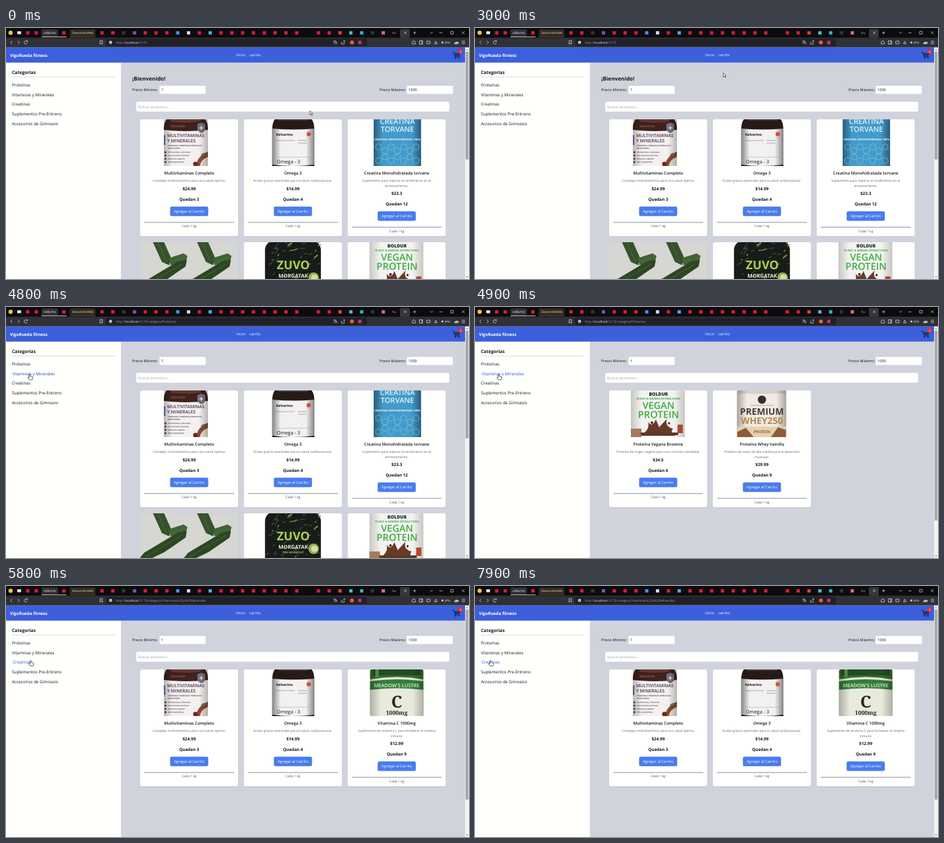
Recreate the animation shown at these times as an HTML page. Size 704 by 382 pixels, loop 8000 ms.

```html
<!DOCTYPE html>
<html lang="es">
<head>
<meta charset="utf-8">
<title>Tienda de suplementos</title>
<style>
html, body { margin: 0; width: 100%; height: 100%; overflow: hidden; background: #d0d3dc; }
svg { display: block; width: 100vw; height: 100vh; font-family: "Open Sans", "Noto Sans", sans-serif; text-rendering: geometricPrecision; }
</style>
</head>
<body>
<svg id="stage" viewBox="0 0 704 382" preserveAspectRatio="none"></svg>
<script>
const LOOP = 8000, STEP = 100;
const INK = '#10141d', RED = '#e0193a';

const rect = (x, y, w, h, fill, extra = '') =>
  `<rect x="${x}" y="${y}" width="${w}" height="${h}" fill="${fill}" ${extra}/>`;
const circle = (x, y, r, fill) => `<circle cx="${x}" cy="${y}" r="${r}" fill="${fill}"/>`;
const line = (d, color, width = 0.8, extra = '') =>
  `<path d="${d}" fill="none" stroke="${color}" stroke-width="${width}" ${extra}/>`;
const shape = (d, fill, extra = '') => `<path d="${d}" fill="${fill}" ${extra}/>`;
const text = (x, y, str, size, fill = INK, weight = 400, extra = '') =>
  `<text x="${x}" y="${y}" font-size="${size}" fill="${fill}" font-weight="${weight}" ${extra}>${str}</text>`;
const label = (x, y, str, size, fill, weight, extra = '') =>
  text(x, y, str, size, fill, weight, 'text-anchor="middle" ' + extra);
const group = (content, attrs = '') => `<g ${attrs}>${content}</g>`;
const repeat = (n, fn) => Array.from({ length: n }, (_, i) => fn(i)).join('');
const noise = n => { const v = Math.sin(n * 12.9898) * 43758.5453; return v - Math.floor(v); };

// Product pictures, drawn in a 149 x 71 box
const art = {
  multi() {
    const purple = '#463350';
    return shape('M40 0H99Q103 6 103 14V71H36V14Q36 6 40 0Z', '#3f211d') +
      shape('M46 0H92V3Q70 7 46 3Z', '#64382f') + label(58, 11.5, 'bienestar', 5, '#8f665b', 600) +
      shape('M36 16Q70 20 103 16V71H36Z', '#f4f0ee') +
      shape('M87 7L93 5L99 7V15Q98 19 93 21Q88 19 87 15Z', '#73717d') + line('M90 13H96M93 10V16', '#fff', 1.2) +
      rect(36, 24, 2.4, 15, '#7d77bd') +
      text(41, 26.7, 'MULTIVITAMINAS', 6.8, purple, 600) + text(41, 35.2, 'Y MINERALES', 6.8, purple, 600) +
      text(42, 41, 'VITAMINAS Y MINERALES ESENCIALES', 2.9, purple, 600) +
      text(42, 44.8, 'DOSIS DIARIA', 2.9, purple, 600) +
      repeat(4, i => circle(38.5, 50 + i * 5, 1.6, '#5c4376') +
        text(42, 51 + i * 5, ['25 vitaminas y minerales', 'Con extractos de frutas', 'Apto para veganos', '365 comprimidos'][i], 2.9, purple, 600)) +
      shape('M85 71Q86 57 103 49V71Z', '#8a4a38') + shape('M91 71Q91 62 103 57V71Z', '#efe2d6') +
      circle(84, 68, 3.5, '#6a2622') + shape('M92 55Q96 49 100 52Q97 56 92 55Z', '#6a7b45') + rect(36, 0, 67, 71, 'url(#shade)', 'opacity=".25"');
  },
  omega() {
    return shape('M47 0H103Q107 5 107 16V71H43V16Q43 5 47 0Z', '#261a18') + rect(52, 0, 46, 2, '#4c3a35') +
      shape('M43 14Q75 17 107 14V69Q75 73 43 69Z', '#f3f1f0') + rect(43, 14, 64, 57, 'url(#shade)', 'opacity=".45"') +
      text(49, 24.8, 'Kelvarino', 5.3, INK, 700) + circle(98.5, 22.5, 3.2, '#de4b36') +
      text(49, 33, 'Omega-3 para el corazón', 2.4, '#444') + text(82, 33, 'Salud diaria', 2.4, '#444') +
      text(82, 37, '60 cápsulas', 2.4, '#444') +
      line('M50 57.5H101', '#888', 0.4) + text(50, 66.5, 'Omega - 3', 7.4, '#1d1d1d', 500);
  },
  creatine() {
    const hex = (x, y) => line(`M${x} ${y - 5}l4.3 2.5v5l-4.3 2.5l-4.3-2.5v-5z`, '#9cd0e8', 0.6);
    return rect(39.5, 0, 72, 71, '#429bcb') + rect(39.5, 0, 72, 71, 'url(#shade)', 'opacity=".4"') +
      repeat(14, i => hex(47 + i % 7 * 9.5, 42 + Math.floor(i / 7) * 15 + i % 2 * 6)) +
      label(75.5, 7, 'CREATINA', 11.2, '#e4f0f5', 600) + label(75.5, 18.7, 'TORVANE', 11.2, '#e4f0f5', 600) +
      label(75.5, 32.3, 'CREATINA MONOHIDRATADA 100%', 4.1, '#eff7fa', 700);
  },
  straps() {
    const strap = x => group(
      shape('M19 -1H36L47 24L44 35L33 30Z', '#35522b') + shape('M44 24L66 17L72 21L69 31L46 35Z', '#426335') +
      shape('M58 29L71 27L69 37L37 59L10 72H-4L6 60Z', '#2c4722') +
      line('M27 0L40 30M47 30L68 23M64 33L8 66', '#587347', 0.7), `transform="translate(${x})"`);
    return rect(0, 0, 149, 71, '#d6d6d2') + strap(0) + strap(67);
  },
  preworkout() {
    return shape('M38 0H111Q117 5 117 12V71H32V12Q32 5 38 0Z', '#171c18') +
      repeat(60, i => {
        const x = 33 + noise(i + 1) * 80, y = noise(i + 70) * 68;
        return line(`M${x} ${y}l${2 + noise(i + 9) * 5} ${-6 * noise(i + 30)}`, i % 4 ? '#465043' : '#8da44e', 1.2);
      }) +
      rect(51, 25, 48, 18, '#1a201a', 'opacity=".65"') +
      label(75, 41, 'ZUVO', 18, '#add253', 700) + label(75, 53.5, 'MORGATAK', 8, '#eef0dc', 700) +
      label(75, 61, 'PRE-WORKOUT', 4.5, '#b9d18a', 600) + circle(106, 54, 8, '#93b34b') + circle(107, 54, 5, '#d7dbaa');
  },
  vegan() {
    const green = '#3cae43';
    return rect(33, 0, 82, 71, '#f3f2ef') + rect(33, 0, 82, 71, 'url(#shade)', 'opacity=".18"') +
      label(75, 7.7, 'BOLDUR', 6.9, '#1c2b22', 800) +
      label(75, 14.3, 'PLANT &amp; GREENS EXTRACTIONS', 4.3, green, 700) +
      label(75, 27.5, 'VEGAN', 14.5, green, 600) + label(75, 41.5, 'PROTEIN', 14.8, green, 600) +
      shape('M53 65Q62 57 59 48Q66 57 71 44L76 56L88 43Q84 55 97 58Q92 65 101 69H47Z', '#673a2a') +
      circle(65, 49, 2, '#4f2a20') + circle(91, 50, 1.7, '#4f2a20') +
      rect(33, 58, 16, 13, '#a77a59') + rect(48, 64, 57, 4, '#5d3728') + rect(104, 52, 8, 13, '#ac4b33');
  },
  whey() {
    return rect(36.5, 0, 75, 71, '#f0eae2', 'rx="2"') + rect(38, 0, 72, 5, '#d6d0c6') +
      rect(36.5, 0, 75, 71, 'url(#shade)', 'opacity=".3"') +
      circle(74.5, 14, 6.3, '#33312f') + rect(57, 22.5, 35, 0.7, '#9a8c7d') +
      label(74.5, 37, 'PREMIUM', 13.8, '#493a34', 700) + label(74.5, 51, 'WHEY250', 13.8, '#ae8751', 700) +
      rect(37, 55, 74, 16, '#e6d0ae') + shape('M37 63L50 57L62 71H37ZM111 60L99 56L88 71H111Z', '#8d5c3a') +
      label(74.5, 65, 'PROTEIN', 6, '#74523a', 600);
  },
  vitaminC() {
    return rect(34, 0, 81, 71, '#376d2a', 'rx="3"') + rect(38, 0, 73, 9, '#224d22') + rect(42, 0, 5, 12, '#5b944b') +
      shape('M34 15Q75 8 115 15V71H34Z', '#e8eadc') +
      shape('M34 18Q75 12 115 18V31Q75 26 34 31Z', '#347e39') +
      label(74.5, 27, 'MEADOW\'S LUSTRE', 7.5, '#f3f5e5', 600) +
      label(74.5, 58, 'C', 25, '#20251f', 700, 'style="font-family:\'Noto Serif\',serif"') +
      label(74.5, 68.5, '1000mg', 8.7, '#252b23', 700, 'style="font-family:\'Noto Serif\',serif"') +
      rect(34, 0, 81, 71, 'url(#shade)', 'opacity=".25"');
  }
};

const products = {
  multi: ['Multivitaminas Completo', ['Complejo multivitamínico para una salud óptima.'], '$24.99', 3],
  omega: ['Omega 3', ['Ácidos grasos esenciales para la salud cardiovascular.'], '$14.99', 4],
  creatine: ['Creatina Monohidratada torvane', ['Suplemento para mejorar el rendimiento en el', 'entrenamiento.'], '$23.3', 12],
  vegan: ['Proteína Vegana Brownie', ['Proteína de origen vegetal para una nutrición saludable.'], '$34.5', 6],
  whey: ['Proteína Whey Vainilla', ['Proteína de suero de alta calidad para el desarrollo', 'muscular.'], '$29.99', 9],
  vitaminC: ['Vitamina C 1000mg', ['Suplemento de vitamina C para fortalecer el sistema', 'inmune.'], '$12.99', 9]
};

function card(id, index) {
  const x = 204 + index % 3 * 157.8, y = 139 + Math.floor(index / 3) * 187;
  let body = rect(0.3, 1, 149, 178, '#bbbfc9', 'rx="3"') + rect(0, 0, 149, 178, '#fffffd', 'rx="3"') +
    group(art[id](), 'clip-path="url(#picture)"');
  if (products[id]) {
    const [title, desc, price, stock] = products[id], d = (desc.length - 1) * 7.3;
    body += label(74.5, 84.2, title, 6.25, INK, 600) +
      desc.map((s, i) => label(74.5, 95.4 + i * 7.3, s, 4.85, '#5d6470')).join('') +
      label(74.5, 107.6 + d, price, 6.4, INK, 700) +
      label(74.5, 124 + d, 'Quedan ' + stock, 6.3, INK, 700) +
      rect(45.5, 132.7 + d, 58, 14.6, '#4a7cec', 'rx="2.4"') +
      label(74.5, 142 + d, 'Agregar al Carrito', 5.7, '#fff') +
      rect(6, 156.2 + d, 137, 1.3, '#a2a9bf') +
      label(74.5, 164.4 + d, 'Cada 1 kg', 5, '#4b525f');
  }
  return group(body, `transform="translate(${x} ${y})"`);
}
const list = (id, ids) => group(ids.map(card).join(''), `id="${id}"`);

function tabStrip() {
  const tint = { 2: '#33353a', 3: '#7656b5', 7: '#4b8df0', 8: '#ded5f5', 10: '#57a6eb', 19: '#0c0c0f',
    22: '#e04335', 23: '#55b8cb', 24: '#2bb7c9', 25: '#33353a', 26: '#e06a84' };
  const square = (x, c) => rect(x - 2.5, 4.9, 5, 5, c);
  return rect(0, 0, 704, 15, '#0c0c0f') + circle(7, 7.3, 3.2, '#e3c64c') + rect(17, 5, 6, 4.6, '#e5e5e5', 'rx="1"') +
    [33, 46, 88].map(x => square(x, RED)).join('') +
    rect(54, 2, 25, 11, '#303136', 'rx="2"') + text(57, 9.2, 'vidlumo', 5, '#f4f4f4') + rect(54, 13, 38, 0.9, '#d6d6d6') +
    rect(97, 2, 39, 11, '#302b22', 'rx="2"') + text(100.5, 9.2, 'DesarrolloWeb', 4.7, '#f2dfa6') + rect(97, 13, 39, 0.6, '#84613b') +
    repeat(27, i => square(146 + i * 16.45, tint[i] || RED)) +
    text(587, 9, 'Nu', 4.8, '#aaa') + rect(599, 1.5, 15, 13.5, '#36373c', 'rx="2"') +
    line('M605.3 5.5l3.6 3.6m0-3.6l-3.6 3.6M619 7.3h4.6M621.3 5v4.6M645.2 6.2l2 2l2-2M659 7.4h4.5M676 5.2h4v4h-4zM693.3 5.2l4 4m0-4l-4 4', '#dedede', 0.7);
}

function toolbar() {
  return rect(0, 14.7, 704, 14.7, '#303136') + rect(152, 16.5, 397, 11, '#202126', 'rx="2"') +
    line('M9.5 19.5l-2.5 2.5l2.5 2.5M18 19.5l2.5 2.5l-2.5 2.5M32.2 20.4a2.5 2.5 0 1 0 .2 2.7M32.5 18.8v2h-2M143 19.2h3.6v5.4l-1.8-1.5l-1.8 1.5z', '#d7d7d9', 0.8) +
    circle(159, 22, 2.4, '#cfcfd1') + rect(158.7, 21.4, 0.7, 2, '#333') +
    text(167, 23.8, 'http://<tspan fill="#eee">localhost</tspan>:5173<tspan id="path"></tspan>', 4.9, '#9b9ca3') +
    line('M497.5 20h4M499.5 19v1M498 24l3-4M500.5 24.7l1.6-4l1.6 4M510 21v3.5h4.5v-2M512 22.5l3-3M513 19.4h2v2', '#c8c8ca') +
    circle(526, 22, 3, '#ef5b32') + rect(535.5, 19.5, 5, 5, '#c7376a') +
    line('M617.5 22.2a2.5 2.5 0 1 1 5 0v2h-5zM628.5 19.5h5v5h-5zM632 19.5v5M639.8 20h5v4h-5zM651.5 24l2-4l2 4z', '#d7d7d9') +
    circle(663.5, 22, 1.6, '#d1d1d3') + text(666.5, 23.8, 'VPN', 4.6, '#e1e1e1') +
    shape('M681 23.5q4-5 8-1l-2 2h-5z', '#bbb') + line('M693 20h5M693 22h5M693 24h5', '#d7d7d9', 0.7);
}

function header() {
  return rect(0, 29.4, 698, 23.2, '#3c5fdc') + text(6, 43.6, 'VigoRueda fitness', 6.4, '#fff', 700) +
    text(350, 43.2, 'Inicio', 5.7, '#f5f7ff') + text(370, 43.2, 'carrito', 5.7, '#f5f7ff') +
    line('M678.7 37h2.2l1.8 6.2h6.9', '#17234f', 1.1) +
    shape('M681.2 38.2h9.8l-1.4 4.2h-7z', '#22336e') + circle(683.6, 45.2, 1.2, '#17234f') + circle(688.8, 45.2, 1.2, '#17234f') +
    circle(691, 35.7, 3.6, '#e22e36') + label(691, 37.5, '1', 4.8, '#fff', 600);
}

const categories = ['Proteínas', 'Vitaminas y Minerales', 'Creatinas', 'Suplementos Pre-Entreno', 'Accesorios de Gimnasio'];
function sidebar() {
  return rect(0, 52.6, 174.7, 330, '#fffffc') + text(9, 69.5, 'Categorías', 6.8, INK, 700) +
    rect(9, 74.2, 157, 0.9, '#d5d8df') +
    categories.map((s, i) => text(9, 88.8 + i * 14.7, s, 6.35, INK, 500, 'class="category"')).join('');
}

function filters() {
  const field = (x, name, value) => text(x, 96.2, name, 5.6) +
    rect(x + 41.5, 88, 70, 12.2, '#fffffd', 'rx="1"') + text(x + 44, 96.2, value, 5.6);
  return field(192, 'Precio Mínimo:', '1') + field(568, 'Precio Máximo:', '1000') +
    rect(198, 112.2, 476, 15, '#fffffd', 'rx="2.5"') + text(201, 121.7, 'Buscar productos...', 5.4, '#a0a4ad');
}

const stage = document.getElementById('stage');
stage.innerHTML =
  '<defs><clipPath id="picture"><rect width="149" height="71" rx="2"/></clipPath>' +
  '<linearGradient id="shade"><stop/><stop offset=".2" stop-opacity="0"/>' +
  '<stop offset=".8" stop-opacity="0"/><stop offset="1"/></linearGradient></defs>' +
  rect(0, 0, 704, 382, '#d0d3dc') +
  group(text(192, 79.7, '¡Bienvenido!', 8.2, INK, 700), 'id="welcome"') +
  group(filters() + list('all', ['multi', 'omega', 'creatine', 'straps', 'preworkout', 'vegan']) +
    list('proteins', ['vegan', 'whey']) + list('vitamins', ['multi', 'omega', 'vitaminC']), 'id="page"') +
  sidebar() + header() + rect(698, 29.4, 6, 353, '#f3f3f3') +
  rect(698.8, 36, 4.4, 164, '#a5a6a8', 'id="thumb"') +
  shape('M699.5 34l1.5-2l1.5 2zM699.5 378l1.5 2l1.5-2z', '#777') +
  tabStrip() + toolbar() +
  group(
    shape('M0 0V6.2L1.5 4.8L2.6 7.2L3.6 6.7L2.6 4.4H4.5Z', '#fff', 'id="arrow" stroke="#111" stroke-width=".6"') +
    shape('M-.8 .7Q0 -.5 .8 .7V3.4L4.2 4.2Q5 4.7 4.7 6L4 8.7H-.5L-3 5.4Q-2.7 4.3 -.8 5.5Z', '#fff', 'id="hand" stroke="#222" stroke-width=".7"'),
    'id="cursor"');

const el = {};
for (const id of ['path', 'welcome', 'page', 'all', 'proteins', 'vitamins', 'thumb', 'cursor', 'arrow', 'hand'])
  el[id] = document.getElementById(id);
const links = document.querySelectorAll('.category');

// [time, x, y] of the pointer tip
const route = [[0, 462, 126], [600, 462, 126], [900, 590, 150], [1200, 560, 290], [1500, 300, 210], [1600, 300, 210],
  [1700, 213, 204], [1800, 150, 200], [1900, 150, 200], [2300, 480, 180], [2500, 480, 180], [3100, 357, 46],
  [3300, 357, 46], [3500, 290, 122], [3600, 290, 122], [3800, 100, 132], [3900, 100, 132], [4300, 27.5, 90],
  [4500, 27, 88], [4800, 36, 102], [5400, 36, 102], [5800, 37.5, 113], [6100, 37.5, 113], [6500, 24, 88],
  [7400, 24, 88], [7700, 30, 101], [7900, 23.5, 113], [8000, 23.5, 113]];
// [category, start, end]
const hovers = [[0, 4350, 4650], [1, 4650, 5550], [2, 5550, 6200], [0, 6450, 7450], [1, 7450, 7700], [2, 7650, 9000]];

const clamp = v => Math.max(0, Math.min(1, v));
const mix = (a, b, k) => a + (b - a) * k;
const show = (node, on) => node.setAttribute('display', on ? 'inline' : 'none');

function pointerAt(t) {
  const i = route.findIndex(p => p[0] > t), a = route[i - 1], b = route[i];
  const k = (t - a[0]) / (b[0] - a[0]);
  return [mix(a[1], b[1], k), mix(a[2], b[2], k)];
}

function render(t) {
  const home = t < 4700, all = t < 4900, vitamins = t >= 5500;
  show(el.welcome, home);
  show(el.all, all);
  show(el.proteins, !all && !vitamins);
  show(el.vitamins, vitamins);
  el.page.setAttribute('transform', `translate(0 ${home ? 0 : -12})`);
  el.thumb.setAttribute('height', all ? 164 : 289);
  el.path.textContent = home ? '' : t < 5400 ? '/category/Proteinas' : '/category/Vitaminas%20y%20Minerales';

  links.forEach((link, i) => {
    const k = Math.max(0, ...hovers.filter(h => h[0] === i)
      .map(([, start, end]) => Math.min(clamp((t - start) / 200), clamp((end + 150 - t) / 150))));
    link.setAttribute('x', 9 + k);
    link.setAttribute('fill', `rgb(${mix(16, 42, k)},${mix(20, 84, k)},${mix(29, 210, k)})`);
  });

  const [x, y] = pointerAt(t);
  const overLink = x < 90 || (y > 139 && x > 204 && x < 669);
  el.cursor.setAttribute('transform', `translate(${x} ${y})`);
  show(el.hand, overLink);
  show(el.arrow, !overLink);
}

const begin = performance.now();
function tick() {
  const t = (performance.now() - begin) % LOOP;
  render(Math.floor(t / STEP) * STEP);
  requestAnimationFrame(tick);
}
tick();
</script>
</body>
</html>
```
